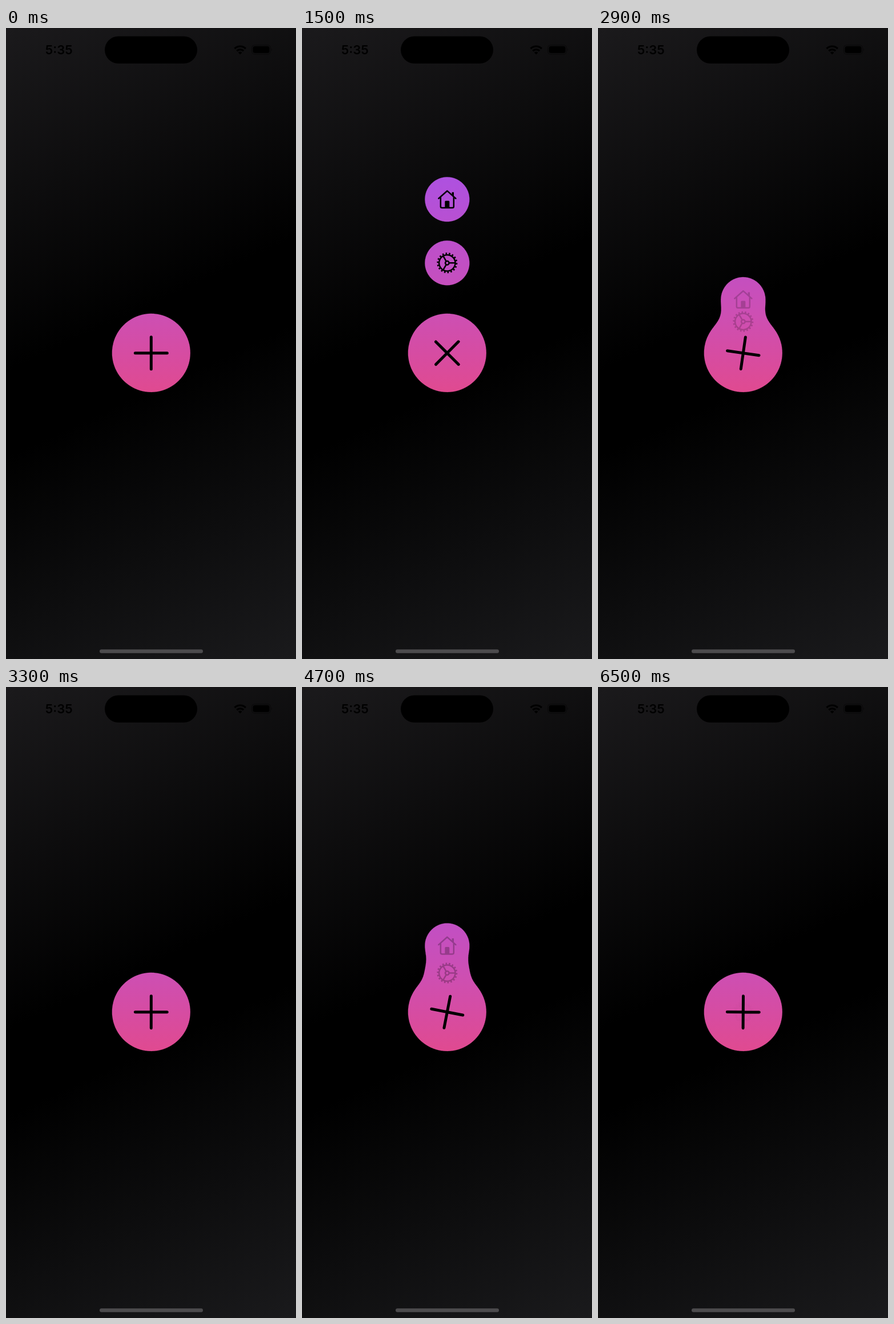
These frames come from a looping animation (508x1102 px, 6.6 s). An HTML page:

```html
<!DOCTYPE html>
<html lang="en">
<head>
<meta charset="utf-8">
<title>Liquid menu button</title>
<style>
  html, body { margin: 0; height: 100%; overflow: hidden; background: #000; }
  svg {
    display: block; width: 100%; height: 100%;
    background: linear-gradient(155.25deg, #1b1a1c, #000 45%, #000 56%, #1a1a1c);
  }
  .icon { fill: none; stroke: #000; stroke-width: 2.5; stroke-linecap: round; stroke-linejoin: round; }
  .solid { fill: #000; stroke: none; }
</style>
</head>
<body>
<svg viewBox="0 0 508 1102">
  <defs>
    <linearGradient id="tint" gradientUnits="userSpaceOnUse" x1="0" y1="260" x2="0" y2="636">
      <stop offset="0" stop-color="#ae51e0"/>
      <stop offset=".4" stop-color="#c14fc4"/>
      <stop offset=".64" stop-color="#cd4fb3"/>
      <stop offset=".82" stop-color="#d64ca2"/>
      <stop offset="1" stop-color="#e04a90"/>
    </linearGradient>
    <!-- blur, then cut the alpha at one half: nearby circles melt together -->
    <filter id="goo" filterUnits="userSpaceOnUse" x="130" y="200" width="250" height="500">
      <feGaussianBlur stdDeviation="11"/>
      <feColorMatrix values="1 0 0 0 0  0 1 0 0 0  0 0 1 0 0  0 0 0 24 -11.5"/>
    </filter>
    <mask id="blob" maskUnits="userSpaceOnUse" x="0" y="0" width="508" height="1102">
      <g filter="url(#goo)" fill="#fff">
        <circle cx="254.3" cy="567.4" r="69.4"/>
        <circle id="homeBall" cx="254.3" r="40.6"/>
        <circle id="gearBall" cx="254.3" r="40.6"/>
      </g>
    </mask>
  </defs>

  <!-- status bar -->
  <text x="92.7" y="46" text-anchor="middle" font-family="Inter, sans-serif" font-size="22" font-weight="600">5:35</text>
  <rect x="173" y="14.5" width="162" height="47.5" rx="23.7"/>
  <g fill="none" stroke="#000" stroke-width="3.2">
    <path d="M400.5 36a13.8 13.8 0 0 1 19.4 0M404.300 40a8.400 8.400 0 0 1 11.800 0"/>
    <path class="solid" d="M410.2 46.300l-3.300-3.400a4.700 4.700 0 0 1 6.600 0z"/>
  </g>
  <rect x="430.500" y="29.800" width="33" height="16" rx="5" fill="none" stroke="#000" stroke-opacity=".4" stroke-width="1.200"/>
  <rect x="432.500" y="31.800" width="29" height="12" rx="3.500"/>
  <path d="M465 35.300q2 2.500 0 5z" fill-opacity=".4"/>

  <rect width="508" height="1102" fill="url(#tint)" mask="url(#blob)"/>

  <g id="home" class="icon">
    <path d="M-15-1.500L0-14.800 15-1.500M-11.500-4V12.500q0 2.300 2.300 2.300H9.200q2.300 0 2.300-2.300V-4"/>
    <path class="solid" d="M8.300-12.500h3.400v8l-3.400-3zM-4 15V4q0-1.500 1.500-1.500h5Q4 2.500 4 4V15z"/>
  </g>
  <g id="gear" class="icon">
    <circle r="14.200"/>
    <circle r="16.500" pathLength="18" stroke-width="3" stroke-linecap="butt" stroke-dasharray=".46 .54"/>
    <circle r="3.300"/>
    <path d="M3.500 0H14M-1.750-3.030L-7-12.120M-1.750 3.030L-7 12.120"/>
  </g>
  <path id="plus" d="M-28 0H28M0-28V28" stroke="#000" stroke-width="5" stroke-linecap="round"/>

  <rect x="164" y="1085.300" width="181" height="6.400" rx="3.200" fill="#4c4b4d"/>
</svg>
<script>
const LOOP = 6600, STEP = 100, CX = 254.3, CY = 567.4;
const TAPS = [980, 2687, 3628, 4514, 5035, 6040];      // open, close, open, ...
const HOLDS = [[2500, 2900], [4100, 4400], [6000, 6200]]; // the picture stands still
const el = id => document.getElementById(id);

// Step responses, s in seconds: a slightly bouncy spring and a critically damped one.
function bouncy(s) {
  const w = 2 * Math.PI / 0.7, z = 0.8, d = Math.sqrt(1 - z * z);
  return 1 - Math.exp(-z * w * s) * (Math.cos(w * d * s) + z / d * Math.sin(w * d * s));
}
function smooth(s) {
  const u = 14.6 * s;
  return 1 - Math.exp(-u) * (1 + u);
}

// Every tap adds one response, alternately up and down.
const respond = (spring, t) => TAPS.reduce((sum, tap, i) =>
  t > tap ? sum + (i % 2 ? -1 : 1) * spring((t - tap) / 1000) : sum, 0);

function place(name, y, opacity) {
  el(name + 'Ball').setAttribute('cy', y);
  el(name).setAttribute('transform', `translate(${CX} ${y})`);
  el(name).setAttribute('opacity', opacity);
}

function draw(time) {
  let t = Math.floor(time % LOOP / STEP) * STEP;
  for (const [from, to] of HOLDS) if (t > from && t < to) t = from;
  const lift = respond(bouncy, t);
  const turn = Math.min(1, Math.max(0, respond(smooth, t)));
  place('home', CY - 265 * lift, turn);
  place('gear', CY - 155.2 * lift, turn);
  el('plus').setAttribute('transform', `translate(${CX} ${CY + 0.3}) rotate(${45 * turn})`);
}

const start = performance.now();
function tick() {
  draw(performance.now() - start);
  requestAnimationFrame(tick);
}
tick();
</script>
</body>
</html>
```
